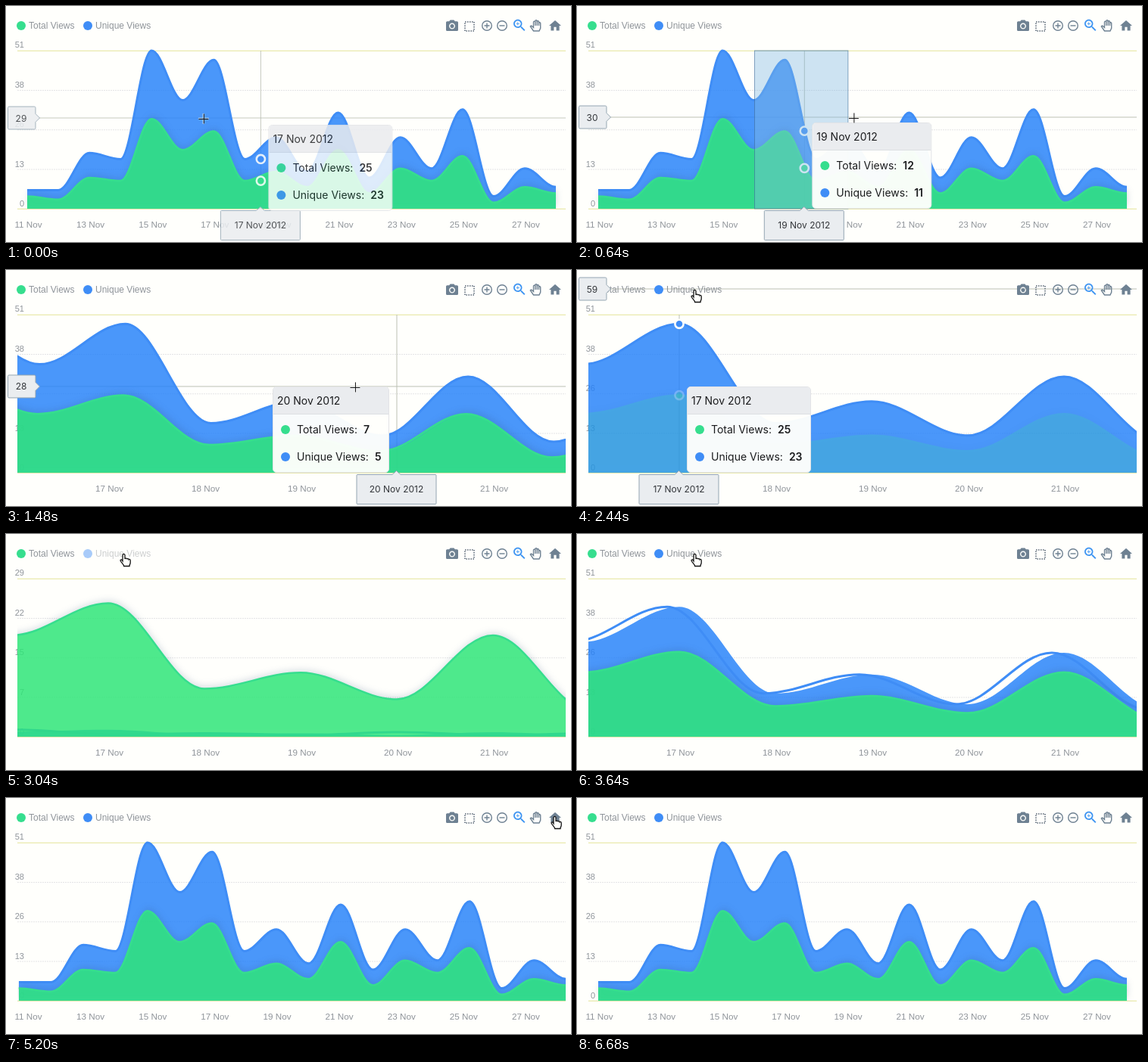
Write an HTML page that moves like this. It is 746 px wide and 312 px high and loops after 6.72 s.

```html
<!DOCTYPE html>
<html lang="en">
<head>
<meta charset="utf-8">
<title>Views chart</title>
<style>
html, body { margin: 0; width: 100%; height: 100%; overflow: hidden; background: #fffffc; }
#stage { position: relative; width: 746px; height: 312px; overflow: hidden; }
svg { position: absolute; left: 0; top: 0; }
svg text { font-family: "Liberation Sans", Arial, sans-serif; fill: #8f949a; }
svg .tipText { font: 12px Inter, sans-serif; fill: #33363a; text-anchor: middle; }
.grid { stroke: #e4e4e6; stroke-dasharray: 2 1; }
.grid.solid { stroke: #e4e498; stroke-dasharray: none; }
.cross { stroke: #bcc0b4; }
.box { fill: #eaedf0; stroke: #94a5b2; }
.icons { fill: #6e8192; }
#greenArea { filter: drop-shadow(1px -4px 4px rgba(40, 70, 120, .2)); }
#tip { position: absolute; left: 0; top: 0; box-sizing: border-box; height: 114px;
  border: 1px solid #e2e3e6; border-radius: 5px; overflow: hidden; white-space: nowrap;
  background: rgba(255, 255, 252, .96); color: #1b1c1e; font: 14px Inter, sans-serif; }
#date { height: 35px; line-height: 36px; padding-left: 5px; background: #eaecef;
  border-bottom: 1px solid #dcdfe2; margin-bottom: 2px; }
.row { height: 36px; line-height: 36px; padding: 0 10px 0 31px; position: relative; }
.row i { position: absolute; left: 10px; top: 12px; width: 12px; height: 12px; border-radius: 50%; }
.row b { margin-left: 8px; font-weight: 600; }
</style>
</head>
<body>
<div id="stage">
<svg width="746" height="312" viewBox="0 0 746 312">
  <defs><clipPath id="plot"><rect x="15" y="50" width="724" height="219"/></clipPath></defs>
  <g id="gridLines"></g>
  <g id="yLabels" font-size="11" text-anchor="end"></g>
  <line id="crossX" class="cross" y1="59" y2="268"/>
  <line id="crossY" class="cross" x1="44" x2="739"/>
  <g clip-path="url(#plot)">
    <path id="blueArea" fill="#2380fb" fill-opacity=".82"/>
    <path id="blueLine" fill="none" stroke="#3f8df6" stroke-width="3"/>
    <g id="green">
      <path id="greenArea" fill="#2feb78" fill-opacity=".82"/>
      <path id="greenLine" fill="none" stroke="#36de8e" stroke-width="2.5"/>
    </g>
  </g>
  <g id="xLabels" font-size="11.7" text-anchor="middle"></g>

  <g font-size="12">
    <circle cx="20" cy="26" r="6" fill="#36de8e"/><text x="30" y="30">Total Views</text>
    <g id="legendBlue"><circle cx="108" cy="26" r="6" fill="#3f8df6"/><text x="118" y="30">Unique Views</text></g>
  </g>

  <g class="icons">
    <g transform="translate(579.4 17) scale(.8)"><circle cx="12" cy="12" r="3.2"/>
      <path d="M9 2L7.17 4H4c-1.1 0-2 .9-2 2v12c0 1.1.9 2 2 2h16c1.1 0 2-.9 2-2V6c0-1.1-.9-2-2-2h-3.17L15 2H9zm3 15c-2.76 0-5-2.24-5-5s2.24-5 5-5 5 2.24 5 5-2.24 5-5 5z"/></g>
    <rect x="606" y="21" width="12" height="12" fill="none" stroke="#5c6a78" stroke-width="1.6" stroke-dasharray="1.6 1.4"/>
    <g fill="none" stroke="#6e8192" stroke-width="1.4">
      <circle cx="635" cy="26" r="6.3"/><path d="M631.5 26h7M635 22.5v7"/>
      <circle cx="655" cy="26" r="6.3"/><path d="M651.5 26h7"/>
      <path d="M696.5 33l-4.2-6c.6-1.2 1.8-1 2.8.2l1.4 1.2v-7.200c0-1.500 2.300-1.500 2.300 0v-1.200c0-1.600 2.400-1.600 2.400 0v.8c0-1.400 2.300-1.400 2.300 0v2c0-1.400 2.200-1.400 2.200 0v6.600l-1.700 3.600z"/>
      <path d="M698.800 21v5M701.200 20v6M703.500 21v5"/>
    </g>
    <g fill="#3d94f2" transform="translate(667.4 15) scale(.88)">
      <path d="M15.5 14h-.79l-.28-.27C15.41 12.59 16 11.11 16 9.5 16 5.91 13.09 3 9.5 3S3 5.91 3 9.5 5.91 16 9.5 16c1.61 0 3.09-.59 4.23-1.57l.27.28v.79l5 4.99L20.49 19l-4.99-5zm-6 0C7.01 14 5 11.99 5 9.5S7.01 5 9.5 5 14 7.01 14 9.5 11.99 14 9.5 14zM12 10h-2v2H9v-2H7V9h2V7h1v2h2v1z"/></g>
    <path transform="translate(715.4 16.5) scale(.8)" d="M10 20v-6h4v6h5v-8h3L12 3 2 12h3v8z"/>
  </g>

  <g id="dots" stroke="#fffffc" stroke-width="2.6">
    <circle id="dotBlue" r="5.6" fill="#3f8df6"/><circle id="dotGreen" r="5.6" fill="#36de8e"/>
  </g>
  <rect id="select" x="234.5" y="59" height="209" fill="#82b8e0" fill-opacity=".4" stroke="#3d6c9c" stroke-opacity=".6"/>
  <g id="xTip">
    <path class="box" d="M-52.5 271.5q0-1 1-1H-5.5L0 265.5 5.5 270.5H51.5q1 0 1 1V308.5q0 1-1 1H-51.5q-1 0-1-1z"/>
    <text id="xTipText" class="tipText" y="294"></text>
  </g>
  <g id="yTip">
    <path class="box" d="M2.5-13.5q0-1.5 1.5-1.5H37.5q1.5 0 1.5 1.5V-5.5L44.5 0 39 5.5V13.5q0 1.5-1.5 1.5H4q-1.5 0-1.5-1.5z"/>
    <text id="yTipText" class="tipText" x="20" y="4.5"></text>
  </g>
</svg>

<div id="tip">
  <div id="date"></div>
  <div class="row"><i style="background:#36de8e"></i>Total Views:<b id="totalVal"></b></div>
  <div class="row"><i style="background:#3f8df6"></i>Unique Views:<b id="uniqueVal"></b></div>
</div>

<svg width="746" height="312" viewBox="0 0 746 312">
  <g id="pointer">
    <g id="cross"><path d="M-7 1H7M0-6V8" stroke="#fffffc" stroke-width="2.6" opacity=".5"/><path d="M-6.5 1.5H6.5M.5-5.5V7.5" stroke="#111"/></g>
    <path id="arrow" d="M0 0V14.5L3.4 11.4 5.6 16.5 8.1 15.4 5.9 10.5H10.5z" fill="#111" stroke="#fffffc"/>
    <path id="hand" transform="translate(.5 1)" d="M-1.5 2c0-2 3-2 3 0v5c.5-1.4 2.7-1.2 2.7.3.6-1.1 2.5-.8 2.5.6.8-.9 2-.4 2 .8v3.3c0 1.7-1.2 2.2-1.2 4.5H.2c0-2-3.2-4.2-4.5-7-.7-1.5 1-2.2 1.9-1l.9 1.3z" fill="#fffffc" stroke="#111" stroke-width="1.3"/>
  </g>
</svg>
</div>

<script>
const LOOP = 6720, BASE = 268, UNIT = 209 / 51, UNIT_SOLO = 209 / 29;
const total  = [4, 3, 10, 9, 29, 19, 25, 9, 12, 7, 19, 5, 13, 9, 17, 2, 7, 5];
const unique = [2, 3, 8, 7, 22, 16, 23, 7, 11, 5, 12, 5, 10, 4, 15, 2, 6, 2];
const ZOOM_IN = 1223, ZOOM_OUT = 4880, HIDE = 2740, SHOW = 3372;

// time, x, y
const cursorPath = [[0, 261, 148], [160, 243, 148], [320, 243, 148], [640, 365, 147], [940, 478, 150],
  [1160, 478, 152], [1480, 461, 154], [1600, 455, 150], [1850, 327, 112], [2100, 200, 58], [2260, 155, 27],
  [2400, 155, 25], [3700, 155, 25], [3960, 370, 62], [4220, 640, 52], [4360, 713, 33], [4480, 724, 23],
  [5560, 724, 23], [5860, 775, 20], [LOOP, 775, 20]];
const cursorKind = [[0, 'cross'], [2240, 'arrow'], [2320, 'hand'], [3760, 'cross'], [4260, 'arrow'], [4430, 'hand']];
// time, hovered day
const hoverDays = [[-300, 8], [-73, 7], [30, 6], [584, 8], [760, 9], [860, 10], [1180, 9], [1600, 8],
  [1850, 7], [2100, 6], [3770, 7], [3900, 8], [4030, 9], [4140, 10]];
const tipFade = [[0, .85], [100, 1], [2460, 1], [2600, 0], [3760, 0], [3860, 1], [4120, 1], [4260, 0], [LOOP, 0]];

const $ = id => document.getElementById(id);
const set = (id, attrs) => { for (const k in attrs) $(id).setAttribute(k, attrs[k]); };
const show = (id, on) => { $(id).style.display = on ? '' : 'none'; };
const fadeTo = (ids, v) => { for (const id of ids) $(id).style.opacity = v; };
const lerp = (a, b, p) => a + (b - a) * p;
const ease = u => .5 - .5 * Math.cos(Math.PI * Math.min(1, Math.max(0, u)));
const morph = (t, start) => ease((t - start) / 350);
const lastIndex = (keys, t) => Math.max(0, keys.findLastIndex(k => k[0] <= t));
const within = (t, a, b) => t >= a && t < b;

function track(keys, t) {
  const i = Math.min(lastIndex(keys, t), keys.length - 2), a = keys[i], b = keys[i + 1];
  const p = (t - a[0]) / (b[0] - a[0]);
  return a.slice(1).map((v, k) => lerp(v, b[k + 1], p));
}

const dayName = i => `${11 + i} Nov`;
const fullX = i => 28 + 41.06 * i;
const zoomX = i => 135 + 127 * (i - 6);

function curve(xs, ys) {
  let d = `M${xs[0]} ${ys[0]}`;
  for (let i = 1; i < xs.length; i++) {
    const c = (xs[i] - xs[i - 1]) * .35;
    d += `C${xs[i - 1] + c} ${ys[i - 1]} ${xs[i] - c} ${ys[i]} ${xs[i]} ${ys[i]}`;
  }
  return d;
}
const closed = (d, xs) => `${d}L${xs.at(-1)} ${BASE}L${xs[0]} ${BASE}Z`;

$('gridLines').innerHTML = [0, 1, 2, 3, 4].map(i =>
  `<line class="grid${i % 4 ? '' : ' solid'}" x1="15" x2="739" y1="${59.25 + i * 52.25}" y2="${59.25 + i * 52.25}"/>`).join('');

let axisKey = '';
function drawAxes(zoomed, solo) {
  const key = `${zoomed}${solo}`;
  if (key === axisKey) return;
  axisKey = key;
  const max = solo ? 29 : 51;
  $('yLabels').innerHTML = [4, 3, 2, 1, 0].map(n =>
    `<text x="24" y="${265 - n * 52.4}">${Math.round(max * n / 4)}</text>`).join('');
  const days = zoomed ? [6, 7, 8, 9, 10] : [0, 2, 4, 6, 8, 10, 12, 14, 16];
  $('xLabels').innerHTML = days.map(i =>
    `<text x="${(zoomed ? zoomX : fullX)(i) + 1.5}" y="293">${dayName(i)}</text>`).join('');
}

function drawChart(t) {
  const z = morph(t, ZOOM_IN) - morph(t, ZOOM_OUT);
  const solo = morph(t, HIDE) - morph(t, SHOW);
  const lag = -5 * Math.sin(Math.PI * z);
  const xs = total.map((_, i) => lerp(fullX(i), zoomX(i), z));
  const greenY = total.map(v => BASE - v * lerp(UNIT, UNIT_SOLO, solo));
  const blueY = total.map((v, i) => BASE - (v + unique[i]) * UNIT * (1 - solo));
  const moved = dx => xs.map(x => x + dx);
  set('blueArea', { d: closed(curve(xs, blueY), xs) });
  set('blueLine', { d: curve(moved(-127 * solo), blueY) });
  set('greenArea', { d: closed(curve(xs, greenY), xs) });
  set('greenLine', { d: curve(moved(lag), greenY) });
  show('blueArea', solo < .99);
  show('blueLine', solo < .99);
  fadeTo(['green'], within(t, 2380, HIDE) ? .2 : 1);
  fadeTo(['legendBlue'], within(t, HIDE, SHOW) ? .45 : 1);
  drawAxes(within(t, ZOOM_IN, ZOOM_OUT), within(t, HIDE, SHOW));
}

function drawHover(t, cy) {
  const fade = track(tipFade, t)[0];
  fadeTo(['crossX', 'dots', 'xTip', 'tip'], fade);
  fadeTo(['crossY', 'yTip'], t < 4100 ? fade : 0);
  if (!fade) return;

  const n = Math.max(1, lastIndex(hoverDays, t));
  const [start, to] = hoverDays[n], from = hoverDays[n - 1][1];
  const p = ease((t - start) / 150), py = Math.min(1, p * 2.9);
  const dayX = within(t, 1180, ZOOM_OUT) ? zoomX : fullX;
  const side = i => dayX(i) > 377 ? -1 : 1;
  const x = lerp(dayX(from), dayX(to), p), s = lerp(side(from), side(to), p);
  const dotY = f => BASE - UNIT * lerp(f(from), f(to), py);

  set('crossX', { x1: x, x2: x });
  set('crossY', { y1: cy, y2: cy });
  set('dotBlue', { cx: x, cy: dotY(i => total[i] + unique[i]) });
  set('dotGreen', { cx: x, cy: dotY(i => total[i]) });
  show('dots', !within(t, 1180, 1600));
  fadeTo(['dotGreen'], within(t, 2380, HIDE) ? .25 : 1);

  const day = hoverDays[lastIndex(hoverDays, t + 40)][1];
  const date = `${dayName(day)} 2012`;
  $('date').textContent = $('xTipText').textContent = date;
  $('totalVal').textContent = total[day];
  $('uniqueVal').textContent = unique[day];
  const tip = $('tip'), top = 154 + 3 * Math.max(0, 1 - t / 150);
  tip.style.transform = `translate(${x - tip.offsetWidth * (1 - s) / 2 + 10 * s}px, ${top}px)`;
  set('xTip', { transform: `translate(${x - .5} 0)` });
  set('yTip', { transform: `translate(0 ${cy})` });
  $('yTipText').textContent = Math.round((BASE - cy) / UNIT);
}

function draw(t) {
  const [cx, cy] = track(cursorPath, t);
  const kind = cursorKind[lastIndex(cursorKind, t)][1];
  drawChart(t);
  drawHover(t, cy);
  show('select', within(t, 330, ZOOM_IN));
  set('select', { width: Math.max(0, cx - 242) });
  set('pointer', { transform: `translate(${cx} ${cy})` });
  for (const id of ['cross', 'arrow', 'hand']) show(id, id === kind);
}

const began = performance.now();
function tick() {
  draw((performance.now() - began) % LOOP);
  requestAnimationFrame(tick);
}
tick();
</script>
</body>
</html>
```
